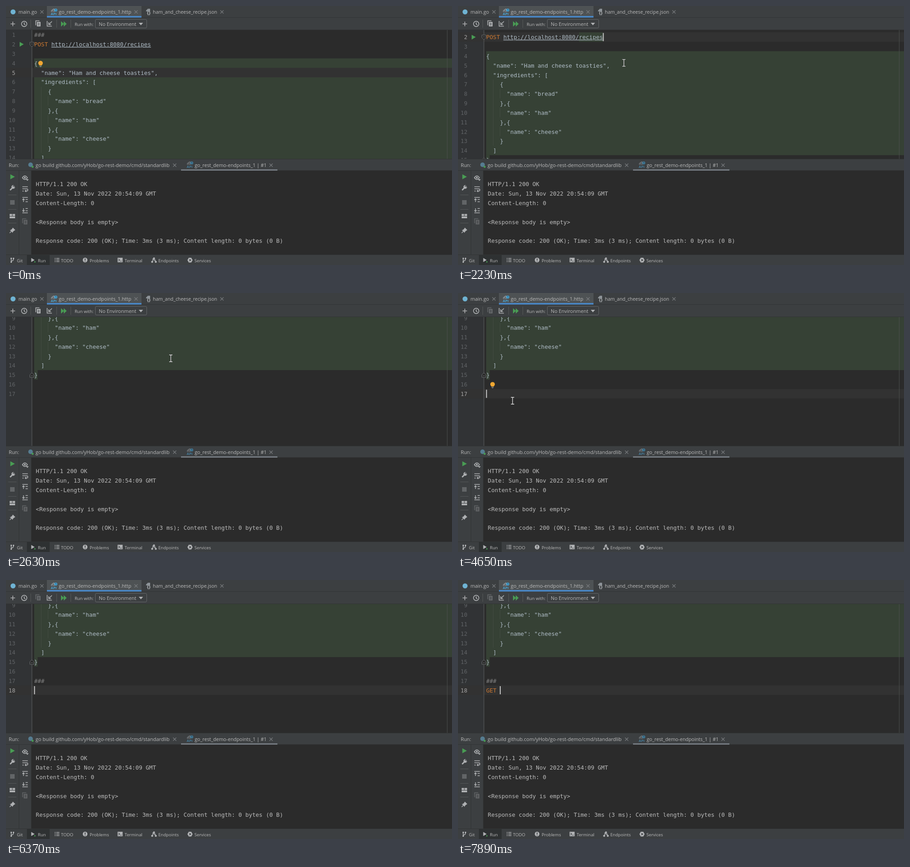
An HTML page for the animation above (8 s loop, 981 px wide and 571 px high).

```html
<!DOCTYPE html>
<html lang="en">
<head>
<meta charset="utf-8">
<title>HTTP client</title>
<style>
html, body { margin: 0; width: 100%; height: 100%; overflow: hidden; background: #2b2b2b; }
svg { display: block; width: 100%; height: 100%; }
text { white-space: pre; }
.ui { font: 10.85px "Open Sans", "Noto Sans", sans-serif; fill: #bbbbbb; }
.small { font-size: 9.6px; }
.mono { font: 12.55px "DejaVu Sans Mono", "Noto Sans Mono", monospace; fill: #bbbbbb; }
.code { fill: #afbcc6; }
.num { font-size: 12.2px; fill: #606366; text-anchor: end; }
.kw { fill: #cc7832; }
.dim { fill: #808080; }
.url { text-decoration: underline; text-underline-offset: 2px; text-decoration-thickness: 1px; }
.green { fill: #364135; }
.ico { fill: none; stroke: #afb1b3; stroke-width: 1.6; }
.fill { fill: #afb1b3; }
.x { fill: none; stroke: #7b7e80; stroke-width: 1.1; }
.sep { fill: none; stroke: #555859; }
.fold { fill: #2b2b2b; stroke: #66696b; }
</style>
</head>
<body>
<svg viewBox="0 0 981 571" xmlns="http://www.w3.org/2000/svg">
  <defs>
    <clipPath id="pane"><rect y="53" width="981" height="284"/></clipPath>
    <path id="close" class="x" d="M-3.5-3.5 3.5 3.5M3.5-3.5-3.5 3.5"/>
    <g id="api">
      <path d="M-1-7H2V0H-6V-3Z" fill="#8b9196"/>
      <path d="M-5-1.500H1M-2-4H1" stroke="#3c3f41"/>
      <circle cx="4.500" cy="-4" r="3.300" fill="#40a4d8"/>
      <path d="M4.500-6V-3.800H6" fill="none" stroke="#31404a"/>
      <text y="7.200" text-anchor="middle" font-family="Open Sans, sans-serif" font-weight="700" font-size="7.800" fill="#4ba6d6">API</text>
    </g>
    <g id="copy">
      <path d="M-5 4V-6H3" class="ico"/>
      <rect x="-2.500" y="-3.500" width="8" height="10" class="fill"/>
      <path d="M-.500-.500H3.500M-.500 1.500H3.500M-.500 3.500H3.500" stroke="#3c3f41" stroke-width=".9"/>
    </g>
  </defs>

  <rect width="981" height="571" fill="#2b2b2b"/>

  <g clip-path="url(#pane)">
    <rect y="53" width="57" height="284" fill="#313335"/>
    <g id="doc"></g>
    <path d="M970.500 53V337" stroke="#4a4d4b"/>
    <g id="popup">
      <rect x="55.500" y="253.500" width="444" height="42" fill="#46484a" stroke="#5a5d5f"/>
      <rect x="56" y="254" width="443" height="21" fill="#113a5c"/>
      <text class="mono code" x="62" y="269">GET</text>
      <text class="ui small" x="62" y="289" fill="#999">Press Enter to insert, Tab to replace</text>
    </g>
  </g>
  <circle id="click" r="11.500" fill="#a79b1c"/>

  <!-- editor tabs and toolbar -->
  <rect width="981" height="52.500" fill="#3c3f41"/>
  <rect x="90" width="208" height="25" fill="#4e5254"/>
  <path d="M0 25.500H981M0 52.500H981" stroke="#323435"/>
  <rect x="90" y="22" width="208" height="3.500" fill="#4a88c7"/>
  <circle cx="15.500" cy="13" r="5.500" fill="#6fb3d2"/>
  <use href="#api" x="105" y="13"/>
  <g transform="translate(313 13)">
    <path d="M-1-7H4V-1H-5V-3Z" fill="#8b9196"/>
    <text y="6" x="1" text-anchor="middle" font-family="Open Sans, sans-serif" font-weight="700" font-size="10" fill="#b4b8bb">{}</text>
  </g>
  <g class="ui">
    <text x="27.500" y="17">main.go</text>
    <text x="116" y="17" font-size="10.800">go_rest_demo-endpoints_1.http</text>
    <text x="323" y="17" style="font-size:10.45px">ham_and_cheese_recipe.json</text>
    <text x="151" y="43.500" style="font-size:9.5px">Run with:</text>
    <text x="204" y="43.500">No Environment</text>
  </g>
  <use href="#close" x="79" y="13"/>
  <use href="#close" x="286" y="13"/>
  <use href="#close" x="475" y="13"/>
  <path class="ico" stroke-width="2" d="M10 39.500H20M15 34.500V44.500"/>
  <circle class="ico" cx="40" cy="39.500" r="5.900"/>
  <path class="ico" d="M40 36V40L42.500 41.500"/>
  <path class="sep" d="M54.500 30V48M111.500 30V48M142.500 30V48"/>
  <use id="copyBtn" href="#copy" x="70.500" y="38.500"/>
  <path class="ico" d="M90.500 33V44.500H101M101 34 94.500 40.500M94 36V41H99"/>
  <path d="M121 33.500 127.500 39.500 121 45.500ZM127 33.500 133.500 39.500 127 45.500Z" fill="#499c54"/>
  <rect x="196.500" y="29.500" width="113" height="19" rx="2.500" fill="none" stroke="#646769"/>
  <path d="M292 37H301.500L296.700 42.500Z" class="fill"/>

  <!-- run window -->
  <rect y="337" width="981" height="26" fill="#3c3f41"/>
  <rect y="363" width="55" height="186" fill="#3c3f41"/>
  <path d="M0 337.500H981M0 362.500H981M28.500 363V548M55.500 363V548" stroke="#323435"/>
  <rect x="385" y="360" width="212" height="3" fill="#747a80"/>
  <circle cx="54" cy="350" r="5" fill="#567c90"/>
  <circle cx="58.500" cy="354.500" r="2.300" fill="#499c54"/>
  <use href="#api" x="404" y="350" opacity=".6"/>
  <g class="ui">
    <text x="6" y="355">Run:</text>
    <text x="65" y="355" style="font-size:11px">go build github.com/yHob/go-rest-demo/cmd/standardlib</text>
    <text x="415" y="355" style="font-size:10.65px">go_rest_demo-endpoints_1 | #1</text>
  </g>
  <use href="#close" x="371" y="351"/>
  <use href="#close" x="583" y="351"/>

  <path d="M9.500 371 19.500 376.500 9.500 382Z" fill="#499c54"/>
  <path d="M9 406 15 400" stroke="#afb1b3" stroke-width="2.800"/>
  <path d="M18.500 396 16 398.500 14.500 397.500 17 395A4 4 0 1 0 20 398.500L18 400.500" class="fill"/>
  <path class="sep" d="M5 416.500H23M5 448.500H23M5 478.500H23"/>
  <rect x="9" y="428" width="10" height="10" fill="#626567"/>
  <path class="fill" d="M8 458.500H13.500V463H8ZM14.500 458.500H20V463H14.500ZM8 464H20V468H8Z"/>
  <path class="fill" d="M15 488.500 20.500 494 18.500 495 15.500 497.500 14.500 500 8.500 494 11 493.500 14 490.500Z"/>
  <path d="M11.500 497 8 500.500" stroke="#afb1b3" stroke-width="1.500"/>

  <path class="ico" stroke-width="1.400" d="M36 378.500Q41.500 370.500 47 378.500Q41.500 386.500 36 378.500Z"/>
  <circle class="fill" cx="41.500" cy="378.500" r="2"/>
  <path class="fill" d="M44 382H50L47 385.500Z"/>
  <path class="ico" d="M36 398.500H48M36 403H45.500Q48 403 48 405.500T45.500 408H42.500M44.500 405.500 42 408 44.500 410M36 408H39"/>
  <path class="ico" d="M36 422H48M43 426.500H48M43 431.500H48M38.500 432V425M36 427.500 38.500 425 41 427.500"/>
  <path class="ico" d="M36 456H48M43 451.500H48M43 446.500H48M38.500 446V453M36 450.500 38.500 453 41 450.500"/>
  <use href="#copy" x="41.500" y="475" opacity=".32"/>
  <g id="console" class="mono"></g>

  <!-- bottom bar -->
  <rect y="548.500" width="981" height="22.500" fill="#3c3f41"/>
  <path d="M0 548.500H981" stroke="#323435"/>
  <rect x="46" y="549" width="50" height="22" fill="#2e3132"/>
  <g class="ui small">
    <text x="24" y="565">Git</text>
    <text x="70" y="565">Run</text>
    <text x="121" y="565">TODO</text>
    <text x="184" y="565">Problems</text>
    <text x="261" y="565">Terminal</text>
    <text x="335" y="565">Endpoints</text>
    <text x="414.500" y="565">Services</text>
  </g>
  <path class="ico" stroke-width="1.400" d="M11.500 556V565M11.500 562Q16.500 562 16.500 558"/>
  <path class="fill" d="M10 555H13V558H10ZM10 563H13V566H10ZM15 555H18V558H15Z"/>
  <path class="fill" d="M55.500 555.500 63 560 55.500 564.500Z"/>
  <circle cx="63.500" cy="564" r="1.500" fill="#499c54"/>
  <path class="ico" stroke-width="1.500" d="M107 556.500H109M110.500 556.500H117.500M107 560H109M110.500 560H117.500M107 563.500H109M110.500 563.500H117.500"/>
  <circle class="fill" cx="174" cy="560" r="5.200"/>
  <path d="M174 556.500V561M174 562.200V563.700" stroke="#3c3f41" stroke-width="1.600"/>
  <rect class="fill" x="245.500" y="555" width="11" height="10"/>
  <path d="M247.500 557.500 250 560 247.500 562.500M251 562.500H254.500" fill="none" stroke="#3c3f41" stroke-width="1.200"/>
  <path class="ico" stroke-width="1.300" d="M321.500 564 325.500 557 329 564M325.500 557 322 558.500M326 561 329 560"/>
  <circle class="fill" cx="325.500" cy="556.500" r="2.200"/>
  <circle class="fill" cx="321.500" cy="564" r="2.200"/>
  <circle class="fill" cx="329.500" cy="564" r="2.200"/>
  <path class="fill" d="M402 555H407.500L410.500 560.300 407.500 565.500H402L399 560.300Z"/>
  <path d="M403.500 557.500 407.700 560.300 403.500 563Z" fill="#3c3f41"/>

  <g id="mouse" fill="none">
    <path d="M-3.500-7.500H-1Q0-7.500 0-6.500Q0-7.500 1-7.500H3.500M0-7V7M-3.500 7.500H-1Q0 7.500 0 6.500Q0 7.500 1 7.500H3.500" stroke="#222" stroke-opacity=".6" stroke-width="2.800"/>
    <path d="M-3.500-7.500H-1Q0-7.500 0-6.500Q0-7.500 1-7.500H3.500M0-7V7M-3.500 7.500H-1Q0 7.500 0 6.500Q0 7.500 1 7.500H3.500" stroke="#e8e8e8" stroke-width="1.300"/>
  </g>
</svg>
<script>
const LOOP = 8000, TOP = 53, ROW = 20.83, X0 = 62, CH = 7.556;
const $ = id => document.getElementById(id);
const rowY = n => TOP + (n - 1) * ROW;
const colX = c => X0 + c * CH;

function add(parent, tag, attrs, text) {
  const e = document.createElementNS('http://www.w3.org/2000/svg', tag);
  for (const k in attrs) e.setAttribute(k, attrs[k]);
  if (text) e.textContent = text;
  return parent.appendChild(e);
}
const show = (e, on) => e.setAttribute('visibility', on ? 'visible' : 'hidden');
const move = (e, x, y) => e.setAttribute('transform', `translate(${x} ${y})`);

const doc = $('doc');
const band = (from, rows, x = X0, w = 981 - X0) =>
  add(doc, 'rect', { class: 'green', x, y: rowY(from), width: w, height: rows * ROW });

band(4, 11);
band(15, 1, X0, CH);
const spill = band(15, 2);
const current = add(doc, 'rect', { width: 981, height: ROW, fill: '#323232' });
const path = band(2, 1, colX(27), 7 * CH);
const hashBg = band(17, 1, X0, CH);

// indent guides
add(doc, 'path', {
  d: `M77.5 ${rowY(7)}V${rowY(14)}` + [8, 10, 12].map(n => `M92.500 ${rowY(n)}v${ROW}`).join(''),
  stroke: '#434c42'
});
add(doc, 'path', { d: 'M57 53V700', stroke: '#606365' });

const foldDown = add(doc, 'path', { class: 'fold', d: 'M-4.500-5H4.500V1L0 5-4.500 1ZM-2-1H2' });
move(foldDown, 57, rowY(2) + 11);
const foldUp = add(doc, 'path', { class: 'fold', d: 'M-4.500 5H4.500V-1L0-5-4.500-1ZM-2 1.500H2' });
add(doc, 'path', { d: `M30 ${rowY(2) + 5.5}l9 5-9 5.500Z`, fill: '#499c54' });

const nums = [];
for (let n = 1; n <= 18; n++)
  nums[n] = add(doc, 'text', { class: 'mono num', x: 20.5, y: rowY(n) + 15.3 }, n);

const code = (n, col, text, cls = '') =>
  add(doc, 'text', { class: 'mono code ' + cls, x: colX(col), y: rowY(n) + 15.3 }, text);
code(1, 0, '###', 'dim');
code(2, 0, 'POST', 'kw');
code(2, 5, 'http://localhost:8080/recipes', 'url');
code(4, 0, '{');
['"name": "Ham and cheese toasties",', '"ingredients": ['].forEach((s, i) => code(5 + i, 2, s));
['bread', 'ham', 'cheese'].forEach((s, i) => {
  code(7 + 2 * i, 4, i ? '},{' : '{');
  code(8 + 2 * i, 6, `"name": "${s}"`);
});
code(13, 4, '}');
code(14, 2, ']');
code(15, 0, '}');
const hashes = code(17, 0, '');
const verb = code(18, 0, '', 'kw');

const bulb = add(doc, 'g', {});
add(bulb, 'path', { d: 'M-2.500 4-4.500 1A5 5 0 1 1 4.500 1L2.500 4Z', fill: '#f0a732' });
add(bulb, 'path', { d: 'M-2.500 5.500H2.500M-1.500 7H1.500', stroke: '#9aa0a3' });
const caret = add(doc, 'rect', { width: 2, height: 18, fill: '#c8c8c8' });

const output = ['HTTP/1.1 200 OK', 'Date: Sun, 13 Nov 2022 20:54:09 GMT', 'Content-Length: 0', '',
  '<Response body is empty>', '', 'Response code: 200 (OK); Time: 3ms (3 ms); Content length: 0 bytes (0 B)'];
output.forEach((s, i) => add($('console'), 'text', { x: 65.6, y: 397.4 + i * ROW }, s));

// the screen refreshes in even steps: start, end, count
const RUNS = [[600, 1320, 8], [1930, 2730, 9], [2830, 3340, 6]];
function held(t) {
  let r = 0;
  for (const [a, b, n] of RUNS) {
    const d = (b - a) / (n - 1);
    if (t >= a) r = a + Math.min(n - 1, Math.floor((t - a) / d + 1e-6)) * d;
  }
  return r;
}

const smooth = p => p * p * (3 - 2 * p);
const span = (t, a, b) => Math.min(1, Math.max(0, (t - a) / (b - a)));
function along(keys, t) {
  let v = keys[0].slice(1);
  for (let i = 1; i < keys.length; i++) {
    const p = span(t, keys[i - 1][0], keys[i][0]);
    v = v.map((c, j) => c + (keys[i][j + 1] - keys[i - 1][j + 1]) * p);
  }
  return v;
}
const SCROLL = [[2190, 0], [2430, 95], [2630, 174.6]];
const DRIFT = [[1830, 372.5, 83], [2330, 363, 136], [2430, 363, 137.5], [2630, 362.5, 144], [2730, 362, 146]];

function mouseAt(t) {
  if (t < 1900) {
    const q = (1 - span(t, 600, 1320)) ** 2;
    return [372.5 + 412 * q, 83 + 382 * q];
  }
  if (t < 2800) return along(DRIFT, t);
  const p = smooth(span(t, 2760, 3136));
  return [362 - 242 * p, 146 + 91.5 * p];
}

const between = (t, a, b) => t >= a && t < b;
// latest value whose time has come
const at = (t, list) => list.reduce((v, [k, x]) => t >= k ? x : v, null);

function draw(t) {
  const h = held(t);
  move(doc, 0, -along(SCROLL, h)[0]);

  const line = at(t, [[0, 5], [1520, 2], [3236, 17], [6370, 18]]);
  const hash = at(t, [[0, 0], [5050, 1], [5350, 2], [5670, 3]]);
  const typed = at(t, [[0, ''], [7260, 'G'], [7367, 'GE'], [7473, 'GET'], [7890, 'GET ']]);
  current.setAttribute('y', rowY(line));
  nums.forEach((e, n) => { e.style.fill = n === line ? '#a4a3a3' : ''; });
  show(nums[18], t >= 6370);

  hashes.textContent = '#'.repeat(hash);
  hashes.style.fill = hash === 3 ? '#808080' : '';
  verb.textContent = typed;
  const inBody = between(t, 5050, 5670);
  show(spill, inBody);
  show(hashBg, inBody);
  hashBg.setAttribute('width', hash * CH);
  show(path, between(t, 1520, 3236));
  move(foldUp, 57, rowY(between(t, 5450, 6080) ? 17 : 15) + 11);

  const col = line === 2 ? 34 : line === 17 ? hash : typed.length;
  caret.setAttribute('x', colX(col) - 0.3);
  caret.setAttribute('y', rowY(line) + 1.5);
  show(caret, t >= 1520 && !between(t, 4150, 4650));

  show(bulb, t < 1520 || between(t, 4050, 5050));
  move(bulb, 76, rowY(t < 1520 ? 4 : 16) + 11.5);
  $('copyBtn').setAttribute('opacity', t < 3640 ? 1 : 0.35);
  show($('popup'), between(t, 7367, 7580));

  const [mx, my] = mouseAt(h);
  move($('mouse'), mx, my);
  show($('mouse'), between(t, 600, 5050));
  move($('click'), mx - 1, my - 0.5);
  show($('click'), between(t, 1520, 1620) || between(t, 3236, 3340));
}

const begin = performance.now();
function tick(now) {
  draw(Math.max(0, now - begin) % LOOP);
  requestAnimationFrame(tick);
}
draw(0);
requestAnimationFrame(tick);
</script>
</body>
</html>
```
